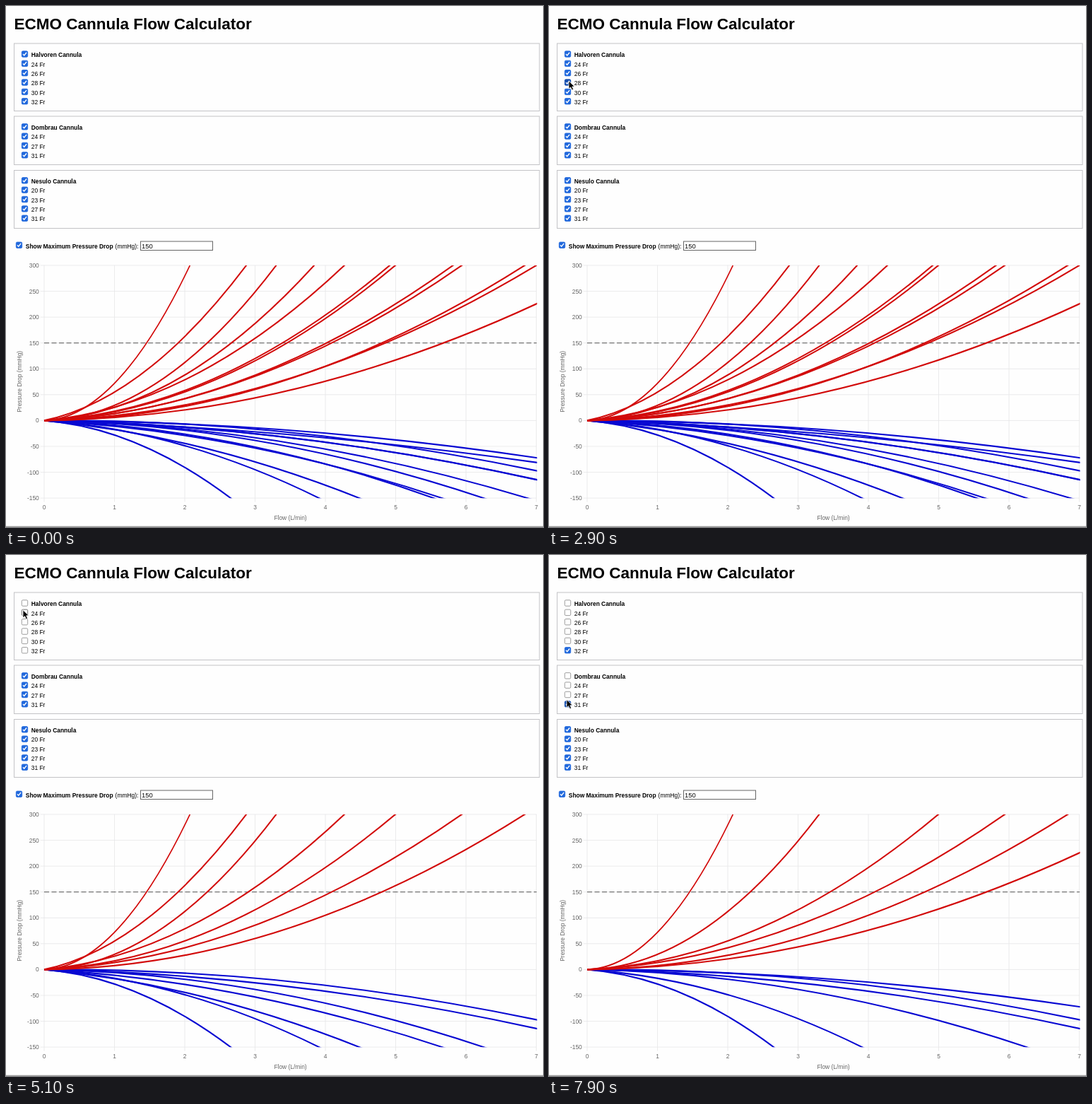
Animation, 760 px wide and 737 px high, one loop 8000 ms. Source, as an HTML page:

```html
<!DOCTYPE html>
<html lang="en">
<head>
<meta charset="utf-8">
<title>ECMO Cannula Flow Calculator</title>
<style>
html, body { margin: 0; width: 100%; height: 100%; overflow: hidden; background: #fefefe; }
svg { display: block; width: 760px; height: 737px; }
text { font: 8.42px "Liberation Sans", Arial, sans-serif; fill: #000; }
.bold { font-weight: bold; }
.title { font-size: 22.5px; font-weight: bold; }
.input { font-size: 9.4px; }
.axis { fill: #666; }
.panel { fill: none; stroke: #c3c3c6; }
.grid { stroke: #e6e6e8; stroke-width: .8; }
.curve { fill: none; stroke-width: 2.1; }
.limit { stroke: #747474; stroke-width: 1.3; stroke-dasharray: 7 3.5; }
</style>
</head>
<body>
<svg id="stage" viewBox="0 0 760 737"></svg>
<script>
const LOOP = 8000;
const stage = document.getElementById("stage");

function add(tag, attrs = {}, parent = stage, content) {
  const node = document.createElementNS("http://www.w3.org/2000/svg", tag);
  for (const key in attrs) node.setAttribute(key, attrs[key]);
  if (content !== undefined) node.textContent = content;
  parent.appendChild(node);
  return node;
}
const label = (x, y, content, cls = "", anchor = "start") =>
  add("text", { x, y, class: cls, "text-anchor": anchor }, stage, content);

// Pressure is a*q^2 + b*q; "red" and "blue" hold two [flow, pressure] points each.
const groups = [
  { name: "Halvoren", box: [53, 148.5], y: 68, sizes: [
    { fr: 24, red: [[3.84, 300], [2, 88]], blue: [[5.54, -150], [4, -84]] },
    { fr: 26, red: [[4.915, 300], [3.39, 150]], blue: [[6.874, -150], [5, -83]] },
    { fr: 28, red: [[5.815, 300], [4.02, 150]], blue: [[7, -114.5], [5, -62]] },
    { fr: 30, red: [[7, 300], [4.854, 150]], blue: [[7, -81], [5, -47]] },
    { fr: 32, red: [[7, 225.5], [5.68, 150]], blue: [[7, -72], [5, -37.5]] }] },
  { name: "Dombrau", box: [156, 224.5], y: 170.8, sizes: [
    { fr: 24, red: [[2.875, 300], [1.905, 150]], blue: [[4.482, -150], [3, -80]] },
    { fr: 27, red: [[4.27, 300], [2.904, 150]], blue: [[5.66, -150], [4, -84]] },
    { fr: 31, red: [[5.94, 300], [4.09, 150]], blue: [[7, -114], [5, -62]] }] },
  { name: "Nesulo", box: [232.5, 314.5], y: 246.8, sizes: [
    { fr: 20, red: [[2.073, 300], [1.457, 150]], blue: [[2.653, -150], [1, -28]] },
    { fr: 23, red: [[3.3, 300], [2.32, 150]], blue: [[3.91, -150], [3, -95]] },
    { fr: 27, red: [[4.995, 300], [3.455, 150]], blue: [[6.25, -150], [4, -65]] },
    { fr: 31, red: [[6.835, 300], [4.803, 150]], blue: [[7, -97], [5, -48.5]] }] }
];
const ROW = 13.35;

// Each click flips a whole group (row 0) or one size; press is the moment the button goes down.
const clicks = [
  { group: 0, row: 0, press: 4500, time: 4800 },
  { group: 0, row: 5, press: 5900, time: 6000 },
  { group: 1, row: 0, press: 6700, time: 6900 },
  { group: 1, row: 3, press: 7600, time: 7700 }
];
const cursorPath = [
  [600, 33, 88], [1300, 27, 71], [2000, 26, 79], [2900, 28, 106], [3700, 30, 116],
  [4000, 30, 116], [4500, 24, 64], [4900, 24, 64], [5600, 24, 133], [6100, 24, 133.5],
  [6650, 27, 171.5], [7000, 27, 171.5], [7500, 25, 204.6], [8000, 25, 204.6]
];

const px = flow => 54 + flow * 99.5;
const py = pressure => 586.4 - pressure * 0.7315;

function curvePath([[q1, p1], [q2, p2]]) {
  const a = (p1 / q1 - p2 / q2) / (q1 - q2);
  const b = p1 / q1 - a * q1;
  // A parabola is exactly one quadratic Bezier.
  return `M${px(0)},${py(0)}Q${px(3.75)},${py(b * 3.75)} ${px(7.5)},${py(a * 56.25 + b * 7.5)}`;
}

function checkbox(x, y) {
  const g = add("g", { transform: `translate(${x} ${y})` });
  const box = add("rect", { x: -4.2, y: -4.2, width: 8.4, height: 8.4, rx: 1.5, "stroke-width": .8 }, g);
  const tick = add("path", { d: "M-2.5,.1L-.8,1.9L2.6,-2.3", fill: "none", stroke: "#fff", "stroke-width": 1.4 }, g);
  return { y, on: true, paint(on, hover, pressed) {
    const blue = pressed ? "#6592e2" : hover ? "#174fae" : "#2068dc";
    box.setAttribute("fill", on ? blue : "#fff");
    box.setAttribute("stroke", on ? blue : hover ? "#4f4f4f" : "#858585");
    tick.setAttribute("visibility", on ? "visible" : "hidden");
  } };
}

function buildForm() {
  label(11.5, 33, "ECMO Cannula Flow Calculator", "title");
  for (const group of groups) {
    const [top, bottom] = group.box;
    add("rect", { x: 11.5, y: top, width: 743.5, height: bottom - top, class: "panel" });
    group.boxes = [null, ...group.sizes].map((size, row) => {
      const y = group.y + row * ROW;
      label(35.8, y + 4.2, size ? `${size.fr} Fr` : `${group.name} Cannula`, size ? "" : "bold");
      return checkbox(26.5, y);
    });
  }
  checkbox(18.5, 338.2).paint(true, false, false);
  label(27.8, 343, "Show Maximum Pressure Drop", "bold");
  label(154.6, 343, "(mmHg):");
  add("rect", { x: 190.5, y: 333, width: 102, height: 12.5, fill: "#fff", stroke: "#666" });
  label(192, 342.8, "150", "input");
}

function buildChart() {
  const line = (x1, y1, x2, y2, cls) => add("line", { x1, y1, x2, y2, class: cls });
  for (let p = -150; p <= 300; p += 50) {
    line(48.5, py(p), 751, py(p), "grid");
    label(46.8, py(p) + 3, p, "axis", "end");
  }
  for (let q = 0; q <= 7; q++) {
    line(px(q), py(300), px(q), 701.5, "grid");
    label(px(q), 711.5, q, "axis", "middle");
  }
  label(402.5, 726.5, "Flow (L/min)", "axis", "middle");
  label(0, 0, "Pressure Drop (mmHg)", "axis", "middle")
    .setAttribute("transform", "translate(21.7 531.3) rotate(-90)");

  const clip = add("clipPath", { id: "plot" });
  add("rect", { x: 53, y: py(300), width: 698.5, height: py(-150) - py(300) }, clip);
  line(54, py(150), 751, py(150), "limit");
  const plot = add("g", { "clip-path": "url(#plot)" });
  for (const [side, stroke] of [["blue", "#0808d2"], ["red", "#d20a0a"]]) {
    for (const size of groups.flatMap(group => group.sizes)) {
      size[side + "Curve"] = add("path", { d: curvePath(size[side]), class: "curve", stroke }, plot);
    }
  }
  line(0, 736.3, 760, 736.3, "edge").setAttribute("stroke", "#858585");
}

function cursorAt(time) {
  const next = cursorPath.findIndex(point => point[0] > time);
  if (next < 1) return null;
  const [t0, x0, y0] = cursorPath[next - 1];
  const [t1, x1, y1] = cursorPath[next];
  const k = (time - t0) / (t1 - t0);
  const ease = k * k * (3 - 2 * k);
  return [x0 + (x1 - x0) * ease, y0 + (y1 - y0) * ease];
}

function isOn(group, row, time) {
  return clicks.reduce((on, click) =>
    click.group === group && click.time <= time && (click.row === 0 || click.row === row) ? click.row > 0 : on, true);
}

buildForm();
buildChart();
const cursor = add("path", {
  d: "M0,0V11.3L2.6,8.9L4.5,13L6.6,12.1L4.8,8.1H8.3Z",
  fill: "#000", stroke: "#fff", "stroke-width": .8, "stroke-linejoin": "round"
});

function render(time) {
  const tip = cursorAt(time);
  cursor.setAttribute("visibility", tip ? "visible" : "hidden");
  if (tip) cursor.setAttribute("transform", `translate(${tip})`);
  groups.forEach((group, g) => group.boxes.forEach((box, row) => {
    const on = isOn(g, row, time);
    const hover = tip !== null && Math.abs(tip[1] - box.y) < ROW / 2;
    const pressed = clicks.some(c => c.group === g && c.row === row && c.press <= time && time < c.time);
    box.paint(on, hover, pressed);
    if (row === 0) return;
    const size = group.sizes[row - 1];
    for (const curve of [size.blueCurve, size.redCurve]) {
      curve.setAttribute("visibility", on ? "visible" : "hidden");
    }
  }));
}

const start = performance.now();
function tick() {
  const elapsed = (performance.now() - start) % LOOP;
  render(Math.floor(elapsed / 100) * 100);
  requestAnimationFrame(tick);
}
tick();
</script>
</body>
</html>
```
